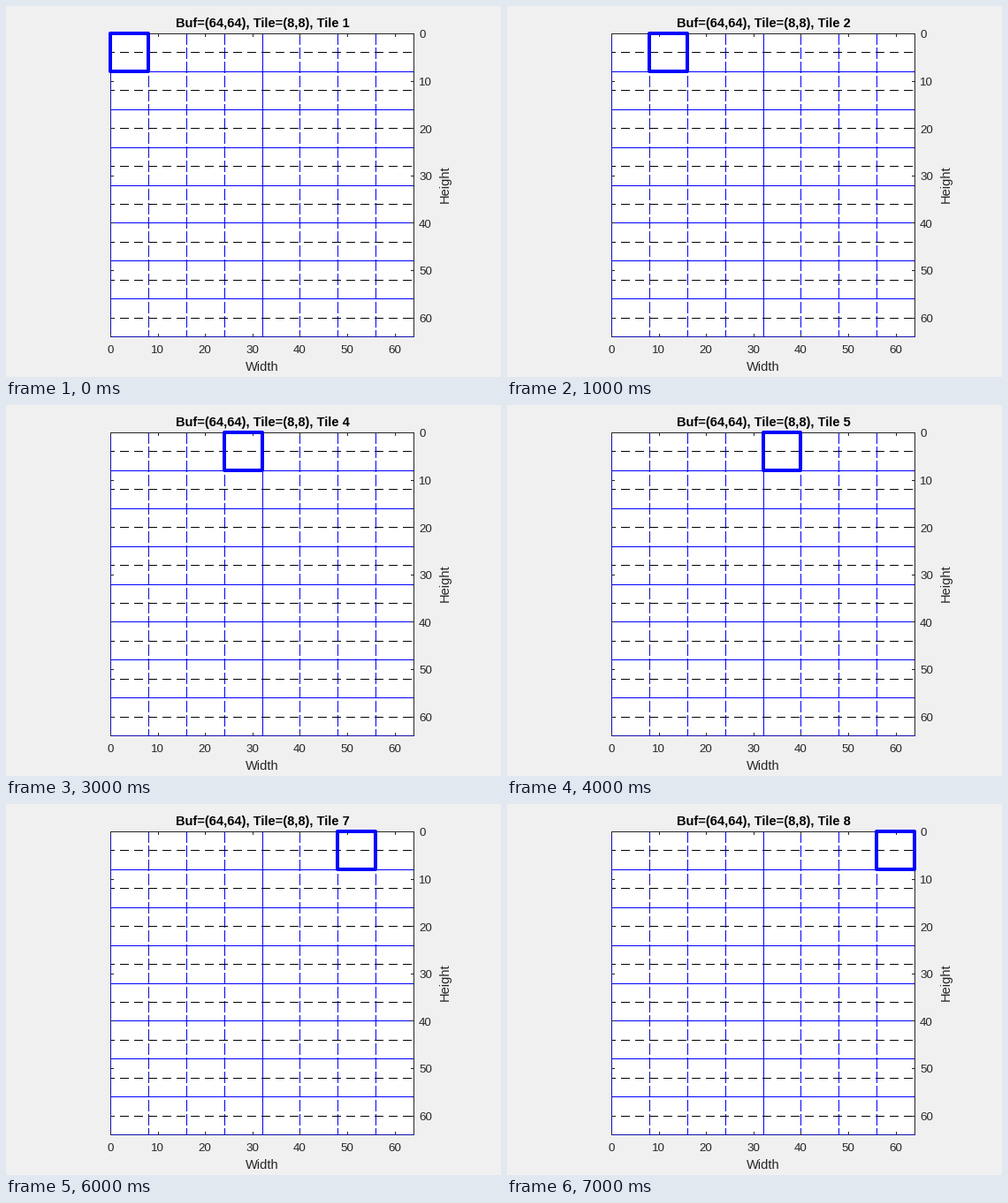
These frames come from a looping animation (560 px wide and 420 px high, 8000 ms). A matplotlib script:

```python
import matplotlib.pyplot as plt
from matplotlib.animation import FuncAnimation
from matplotlib.patches import Rectangle

W, H, DPI = 560, 420, 100
LEFT, TOP, SIDE, BUF, TILE = 118, 31, 343, 64, 8
PX = 72 / DPI
BLUE, NAVY, INK, PALE = "#0000ff", "#1010b0", "#262626", "#d2d2d6"

plt.rcParams["font.family"] = "Liberation Sans"
fig = plt.figure(figsize=(W / DPI, H / DPI), dpi=DPI, facecolor="#f0f0f0")
ax = fig.add_axes([0, 0, 1, 1])
ax.set_xlim(0, W)
ax.set_ylim(H, 0)
ax.axis("off")


def px(v):
    return LEFT + v * SIDE / BUF


def py(v):
    return TOP + v * SIDE / BUF


def line(x0, y0, x1, y1, color, dash=None, z=2):
    style = (dash[0], dash[1:]) if dash else "-"
    # Whole coordinates snap to the pixel with that index
    return ax.plot([x0, x1], [y0, y1], color=color, lw=PX, ls=style, zorder=z,
                   antialiased=False, snap=True, dash_capstyle="butt",
                   solid_capstyle="projecting")[0]


def label(x, y, s, size, **kw):
    kw = {"ha": "center", "va": "baseline", "color": INK, **kw}
    return ax.text(x, y, s, fontsize=size * PX, **kw)


right, bottom = px(BUF), py(BUF)
ax.add_patch(Rectangle((LEFT, TOP), SIDE, SIDE, fc="white", ec="none", zorder=1))

# Tile boundaries: (artist, usual colour, faded colour)
grid = []
LONG, FINE = (0, 13, 3), (0, 3, 1)
for v in range(TILE, BUF, TILE):
    color = NAVY if v == 8 else BLUE
    faded = color if v in (8, 56) else PALE
    dash = FINE if v == 32 else LONG
    grid.append((line(px(v), TOP, px(v), bottom, color, dash), color, faded))
    faded = BLUE if v in (24, 32, 40) else PALE
    grid.append((line(LEFT, py(v), right, py(v), BLUE), BLUE, faded))

# Half-tile rows
for v in range(TILE // 2, BUF, TILE):
    line(LEFT, py(v), right, py(v), "black", (5, 10, 6), z=3)

# Frame and ticks
line(LEFT, TOP, right, TOP, INK, z=4)
line(right, TOP, right, bottom, INK, z=4)
line(LEFT, TOP, LEFT, bottom, NAVY, z=4)
line(LEFT, bottom, right, bottom, NAVY, z=4)
for v in range(0, BUF, 10):
    x, y = px(v), py(v)
    line(x, TOP, x, TOP + 3, INK, z=5)
    line(x, bottom, x, bottom - 3, INK, z=5)
    line(LEFT, y, LEFT + 3, y, INK, z=5)
    line(right, y, right - 3, y, INK, z=5)
    label(x, 393, str(v), 13.33)
    label(467, y + 5.4, str(v), 13.33, ha="left")

label(290, 413, "Width", 14.67)
label(501, 201.5, "Height", 14.67, rotation=90, rotation_mode="anchor")
title = label(290, 24, "", 14.67, weight="bold", color="black")
cursor = Rectangle((LEFT, TOP), TILE * SIDE / BUF, TILE * SIDE / BUF, fc="none",
                   ec=BLUE, lw=4 * PX, joinstyle="round", zorder=6)
ax.add_patch(cursor)


def draw(i):
    title.set_text(f"Buf=({BUF},{BUF}), Tile=({TILE},{TILE}), Tile {i + 1}")
    cursor.set_x(px(i * TILE))
    for artist, color, faded in grid:
        artist.set_color(faded if i == 2 else color)
    return [title, cursor]


anim = FuncAnimation(fig, draw, frames=BUF // TILE, interval=1000,
                     repeat=True, repeat_delay=0, blit=False)
plt.show()
```
